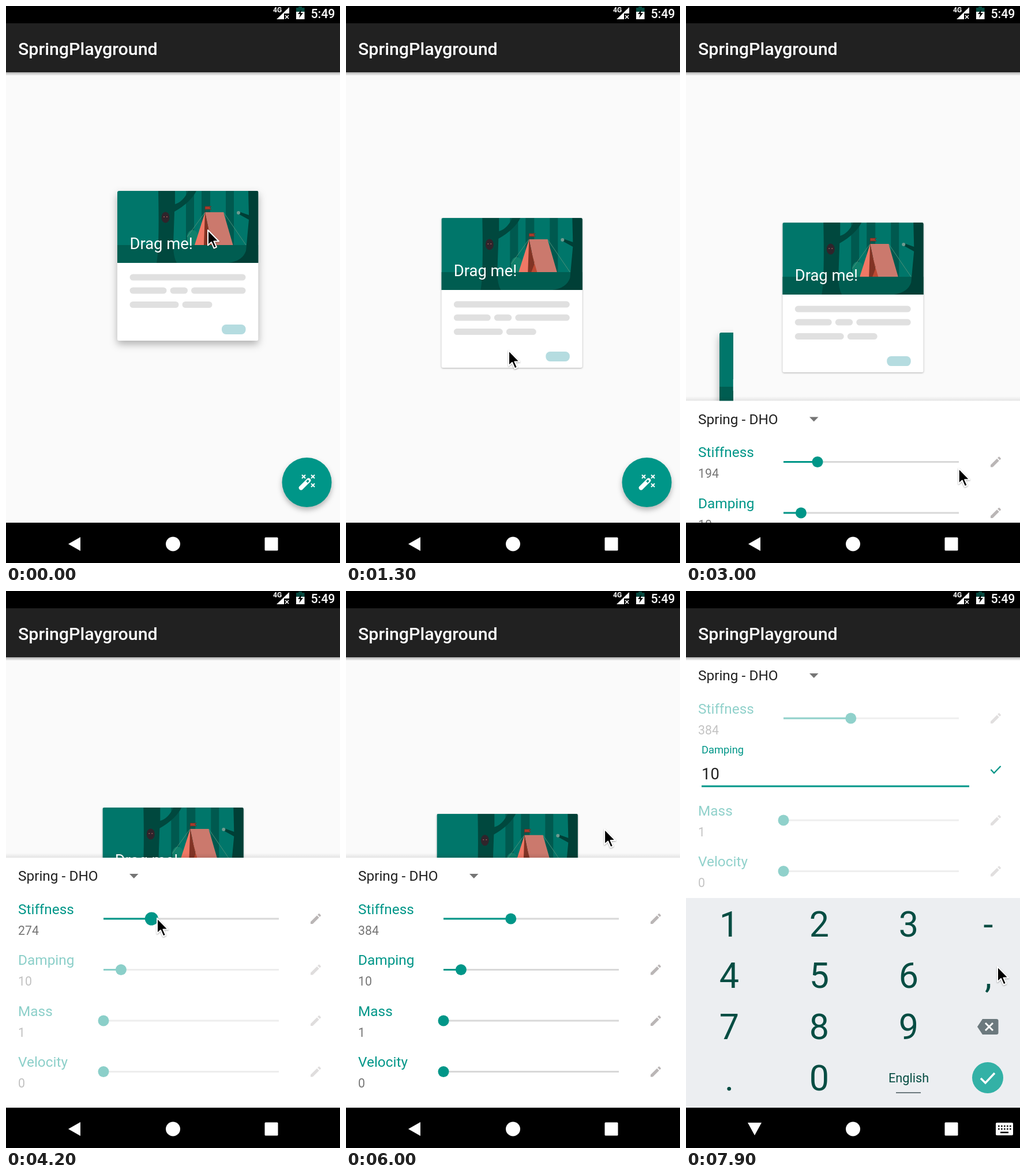
An HTML page for the animation above (8 s loop, 579 by 967 pixels).

```html
<!DOCTYPE html>
<html lang="en">
<head>
<meta charset="utf-8">
<title>Spring demo</title>
<style>
html, body { margin: 0; width: 100%; height: 100%; overflow: hidden; background: #000; }
svg { display: block; width: 579px; height: 967px; font-family: Roboto, "Noto Sans", sans-serif; }
.label { font-size: 24.4px; fill: #009688; }
.value { font-size: 21.3px; fill: #757575; }
.key { font-size: 61px; fill: #074d43; text-anchor: middle; }
</style>
</head>
<body>
<svg viewBox="0 0 579 967">
  <defs>
    <clipPath id="cardClip"><rect width="244.5" height="260" rx="3"/></clipPath>
    <clipPath id="sceneClip"><rect width="244.5" height="125"/></clipPath>
    <clipPath id="sliver"><rect x="40" y="550" width="42" height="300"/></clipPath>
    <linearGradient id="barShade" x2="0" y2="1">
      <stop stop-color="#000" stop-opacity=".3"/><stop offset="1" stop-color="#000" stop-opacity="0"/>
    </linearGradient>
    <linearGradient id="sheetShade" x2="0" y2="1">
      <stop stop-color="#000" stop-opacity="0"/><stop offset="1" stop-color="#000" stop-opacity=".09"/>
    </linearGradient>
    <path id="pencil" fill="#bab6b6" d="M3 17.25V21h3.75L17.81 9.94l-3.75-3.75zM20.71 7.04c.39-.39.39-1.02 0-1.41l-2.34-2.34c-.39-.39-1.02-.39-1.41 0l-1.83 1.83 3.75 3.75z"/>
    <g id="art" clip-path="url(#cardClip)">
      <rect width="244.5" height="260" fill="#fff"/>
      <g clip-path="url(#sceneClip)">
        <rect width="244.5" height="125" fill="#00766a"/>
        <path d="M119 0h14v94h-14zM146 0h15v94h-15zM188 0h14v94h-14z" fill="#00594f"/>
        <rect y="94" width="244.5" height="31" fill="#005d51"/>
        <path d="M71 0H100V23Q114 19 123 0H137Q127 20 99 36L97 94Q97 115 103 125H68Q73 100 71 0Z" fill="#00483e"/>
        <path d="M227 0H245V125H192Q217 122 223 104L228 50 210 40 211 36 228 42Z" fill="#003f36"/>
        <circle cx="210" cy="38" r="3" fill="#6f9b90"/>
        <path d="M121 94V77Q124 68 130 68Q138 67 141 80L142 94Z" fill="#10806b"/>
        <path d="M152 37L121 80M184 37L223 94" stroke="#4d9079" stroke-width="1" fill="none"/>
        <path d="M152 37L134 94H152Z" fill="#f07865"/>
        <path d="M152 37H184L200.500 94H164Z" fill="#cb796d"/>
        <path d="M152 37L150 94H164Z" fill="#813324"/>
        <path d="M153 50L162 78 156 94H166Z" fill="#bd4932"/>
        <path d="M152 38V27H163L160 29 163 32H152" stroke="#6c2d23" stroke-width=".7" fill="#a93a2b"/>
        <ellipse cx="83.500" cy="46" rx="7" ry="9.500" fill="#30242b"/>
        <path d="M80 45h2M85 45h2" stroke="#a45b58" stroke-width="1.500"/>
      </g>
      <text x="21.500" y="101" font-size="27.4" fill="#fff">Drag me!</text>
      <path d="M27 150H217M27 173H80M97 173H116.500M133.500 173H217M27 197.500H101M118 197.500H159" stroke="#e0e0e0" stroke-width="11" stroke-linecap="round"/>
      <rect x="181" y="232" width="41.500" height="17" rx="7.500" fill="#b5dce0"/>
    </g>
  </defs>

  <rect width="579" height="967" fill="#fafafa"/>
  <g id="trace" clip-path="url(#sliver)">
    <use href="#art" x="58" y="567" style="filter:drop-shadow(0 6px 7px rgba(0,0,0,.3))"/>
  </g>
  <circle cx="521.500" cy="827" r="43" fill="#009688" style="filter:drop-shadow(0 5px 5px rgba(0,0,0,.28))"/>
  <g stroke="#fff" fill="none">
    <path d="M511.500 836.500L524.500 823.500" stroke-width="7.500" stroke-linecap="round"/>
    <path d="M521.500 826.500L524.500 823.500" stroke="#009688" stroke-width="3.500"/>
    <path d="M513 814l6 6m0-6l-6 6M529 814l6 6m0-6l-6 6M529 829l6 6m0-6l-6 6" stroke-width="2"/>
  </g>
  <use id="card" href="#art"/>

  <g id="sheet">
    <rect y="455" width="579" height="8" fill="url(#sheetShade)"/>
    <rect y="463" width="579" height="440" fill="#fff"/>
    <text x="21" y="503" font-size="24.4" fill="#212121">Spring - DHO</text>
    <path d="M214 491H229.500L221.700 499Z" fill="#757575"/>
    <g id="rows"></g>
    <g id="field">
      <text x="27" y="630" font-size="18.3" fill="#009688">Damping</text>
      <text x="27" y="675" font-size="27.4" fill="#212121">10</text>
      <path d="M27 687H491" stroke="#009688" stroke-width="3"/>
      <path d="M528.500 658L534 664 545.500 652" stroke="#009688" stroke-width="2.300" fill="none"/>
    </g>
  </g>

  <g id="keyboard">
    <rect y="533" width="579" height="370" fill="#eceef1"/>
    <g id="keys"></g>
    <path d="M505 756.500L514 743H538Q541.500 743 541.500 746V767Q541.500 770 538 770H514Z" fill="#6c797e"/>
    <path d="M519 750l13 13m0-13l-13 13" stroke="#fff" stroke-width="3"/>
    <text x="386" y="853" font-size="21.7" fill="#074d43" text-anchor="middle">English</text>
    <path d="M364 871H407" stroke="#6c797e" stroke-width="2"/>
    <circle cx="523" cy="845" r="27" fill="#33b1a6"/>
    <path d="M511 846L519 854 535 837" stroke="#fff" stroke-width="3.500" fill="none"/>
  </g>

  <rect y="115" width="579" height="6" fill="url(#barShade)"/>
  <rect width="579" height="30"/>
  <rect y="30" width="579" height="85" fill="#212121"/>
  <text x="21" y="84.500" font-size="30.4" font-weight="500" fill="#fff">SpringPlayground</text>
  <g fill="#fff">
    <text x="463" y="10.500" font-size="12" font-weight="700">4G</text>
    <path d="M469 23L491 2V13H482V23Z"/>
    <path d="M484 16l6 6m0-6l-6 6" stroke="#fff" stroke-width="1.700"/>
    <path d="M503 3h4V1h6v2h4.500V10H503Z" fill="#06493f"/>
    <path d="M503 10h14.500V23H503Z"/>
    <path d="M512 6L506 14H510L508 21 515 12H511Z" fill="#000"/>
    <text x="528.500" y="20.500" font-size="21.3" font-weight="500">5:49</text>
  </g>

  <rect y="897" width="579" height="70"/>
  <g fill="#fff">
    <path id="back"/>
    <circle cx="289.500" cy="934" r="12.500"/>
    <rect x="448.500" y="922.500" width="23" height="23" rx="1.500"/>
    <g id="imeIcon">
      <rect x="537" y="923" width="30" height="22" rx="2"/>
      <path d="M541 929H564M541 934H564" stroke="#000" stroke-width="2.500" stroke-dasharray="2.600 2.400"/>
      <path d="M545 940H559" stroke="#000" stroke-width="2.500"/>
    </g>
  </g>
  <path id="cursor" d="M0 0V26.500L6 21 10.500 31.500 15 29.500 10.500 19.500H19Z" stroke="#fff" stroke-width="2" stroke-linejoin="round" style="filter:drop-shadow(0 1px 1px rgba(0,0,0,.35))"/>
</svg>
<script>
const $ = id => document.getElementById(id);
const clamp = v => Math.min(1, Math.max(0, v));
const smooth = v => v * v * (3 - 2 * v);
const ramp = (t, from, to) => smooth(clamp((t - from) / (to - from)));
const move = (el, x, y) => el.setAttribute('transform', `translate(${x} ${y})`);
const show = (el, on) => el.setAttribute('visibility', on ? 'visible' : 'hidden');

const LOOP = 8000, STEP = 100;
const HOME = { x: 167.3, y: 376 };
const TRACK = { x: 169, width: 304 };

const params = [
  { name: 'Stiffness', value: 194, max: 1000 },
  { name: 'Damping', value: 10, max: 100 },
  { name: 'Mass', value: 1, max: Infinity },
  { name: 'Velocity', value: 0, max: 100 }
];
$('rows').innerHTML = params.map((p, i) => `
  <g transform="translate(0 ${i * 88.5})">
    <text class="label" x="21" y="560.5">${p.name}</text>
    <text class="value" x="21" y="596.5"></text>
    <path d="M169 569H473" stroke="#d8d8d8" stroke-width="3"/>
    <path class="fill" stroke="#009688" stroke-width="3"/>
    <circle cy="569" r="9.500" fill="#009688"/>
    <use href="#pencil" x="525" y="557"/>
  </g>`).join('');
const rows = [...$('rows').children];

$('keys').innerHTML = ['123-', '456,', '789', '.0'].map((line, r) =>
  [...line].map((c, i) => `<text class="key" x="${[75, 231, 386, 524][i]}" y="${600 + r * 89}">${c}</text>`).join('')
).join('');

// time, x, y of the pointer tip
const path = [
  [0, 350, 389], [600, 404, 764], [1250, 282, 598], [1330, 282, 598], [1500, 175, 797],
  [1600, 175, 797], [2100, 492, 830], [2700, 500, 830], [2850, 500, 830], [3600, 237.7, 568],
  [3900, 237.7, 568], [4200, 262, 568], [4500, 295.4, 570], [4650, 295.4, 570],
  [5050, 280.5, 380], [5120, 280.5, 380], [5450, 408, 242], [5530, 408, 242],
  [6600, 506, 661], [6950, 530, 654], [7300, 530, 654], [7900, 540, 652]
];
function pointer(t) {
  const i = path.findIndex(k => k[0] > t);
  if (i < 0) return { x: 540, y: 652 };
  const [a, b] = [path[i - 1], path[i]];
  const u = ramp(t, a[0], b[0]);
  return { x: a[1] + (b[1] - a[1]) * u, y: a[2] + (b[2] - a[2]) * u };
}

const drags = [
  { from: 0, to: 600, dx: 157, dy: 68, k: 194 },
  { from: 1330, to: 1510, dx: 117, dy: 230, k: 194 },
  { from: 5100, to: 5520, dx: 113, dy: 4, k: 384 }
];
// Underdamped oscillator: mass 1, damping 10
function oscillate(seconds, k) {
  const w = Math.sqrt(k - 25);
  return Math.exp(-5 * seconds) * (Math.cos(w * seconds) + 5 / w * Math.sin(w * seconds));
}
function cardState(t) {
  const d = drags.filter(g => g.from <= t).pop();
  const p = pointer(Math.min(t, d.to));
  const x = p.x - d.dx, y = p.y - d.dy;
  if (t <= d.to) return { x, y, lift: d.from ? ramp(t, d.from, d.from + 120) : 1 };
  const s = oscillate((t - d.to) / 1000, d.k);
  return {
    x: HOME.x + (x - HOME.x) * s,
    y: HOME.y + (y - HOME.y) * s,
    lift: 1 - ramp(t, d.to, d.to + 200)
  };
}

function updateRows(t, tip) {
  const sliding = ramp(t, 3880, 4050) - ramp(t, 4600, 4800);
  const editing = ramp(t, 7000, 7250);
  const grabbed = clamp((tip.x - 9.7 - TRACK.x) / TRACK.width) * 1000;
  const stiffness = t < 3900 ? 194 : t < 4600 ? Math.round(grabbed) : 384;
  rows.forEach((row, i) => {
    const value = i ? params[i].value : stiffness;
    const x = TRACK.x + TRACK.width * value / params[i].max;
    const knob = row.querySelector('circle');
    row.querySelector('.value').textContent = value;
    row.querySelector('.fill').setAttribute('d', `M169 569H${x}`);
    knob.setAttribute('cx', x);
    knob.setAttribute('r', i ? 9.5 : 9.5 + 2 * sliding);
    row.setAttribute('opacity', i === 1 && editing ? (1 - editing) * (1 - sliding)
      : 1 - .55 * (i ? sliding : 0) - .57 * editing);
  });
  $('field').setAttribute('opacity', editing);
}

function render(t) {
  const tip = pointer(t), card = cardState(t);
  move($('cursor'), tip.x, tip.y);
  move($('card'), card.x, card.y);
  $('card').style.filter = `drop-shadow(0 ${1 + 5 * card.lift}px ${1.5 + 5.5 * card.lift}px rgba(0,0,0,.3))`;
  show($('trace'), t >= 1500 && t < 3300);

  const keyboard = ramp(t, 7300, 7650);
  move($('sheet'), 0, 445 * (1 - ramp(t, 2800, 3200)) - 348 * keyboard);
  move($('keyboard'), 0, 364 * (1 - keyboard));
  show($('imeIcon'), keyboard > 0);
  $('back').setAttribute('d', keyboard > 0 ? 'M107 923H131L119 945Z' : 'M108 934L129 922V946Z');
  updateRows(t, tip);
}

const start = performance.now();
function tick(now) {
  const t = Math.max(0, now - start) % LOOP;
  render(Math.floor(t / STEP) * STEP);
  requestAnimationFrame(tick);
}
render(0);
requestAnimationFrame(tick);
</script>
</body>
</html>
```
